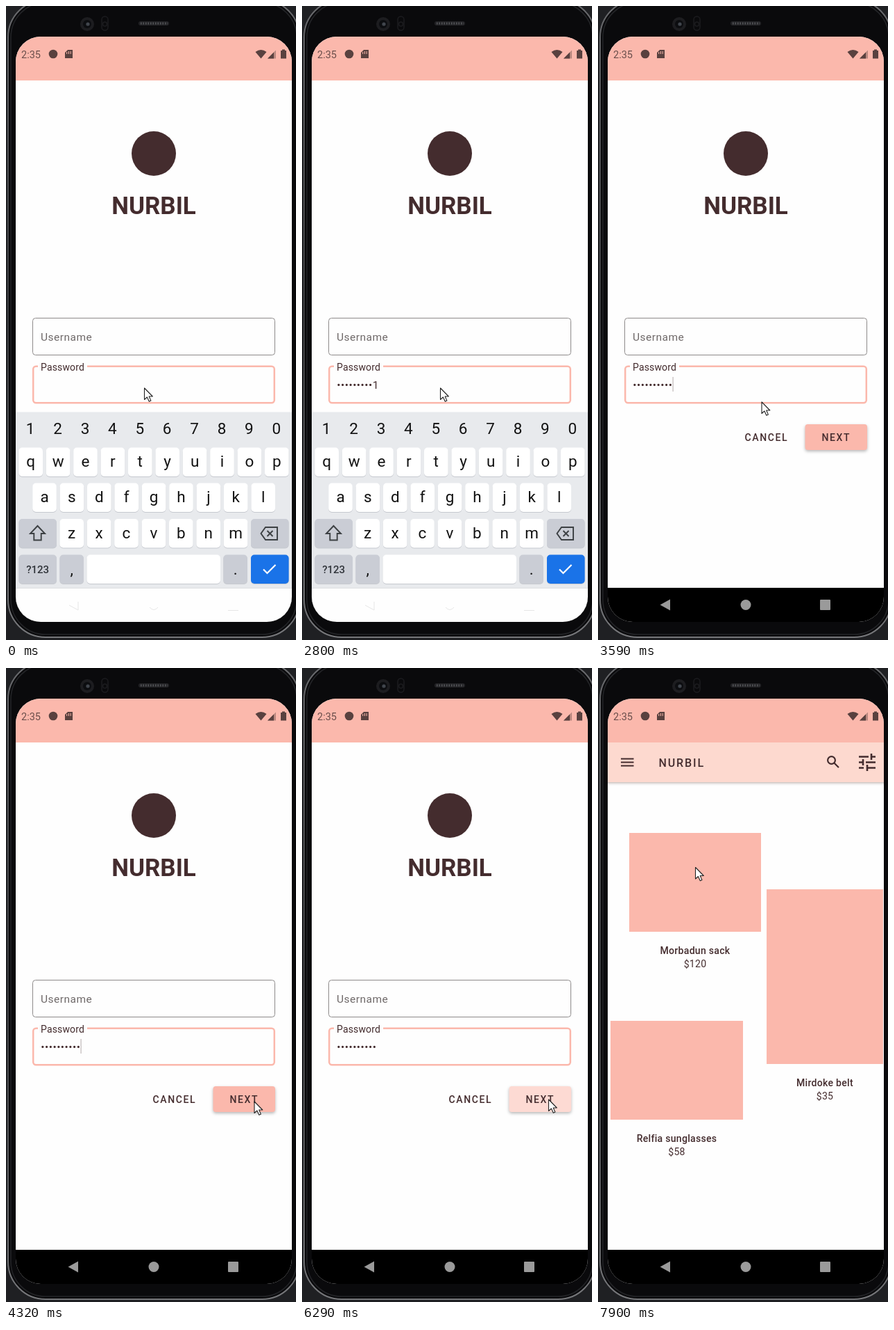
These frames come from a looping animation (418x911 px, 8 s). An HTML page:

```html
<!DOCTYPE html>
<html lang="en">
<head>
<meta charset="utf-8">
<title>Shop login</title>
<style>
  html, body { margin: 0; width: 100%; height: 100%; overflow: hidden; background: #1f2023; }
  svg { display: block; width: 418px; height: 911px; font-family: Roboto, sans-serif; }
  .ink { fill: #442c2e; }
  .line { fill: none; stroke: #442c2e; }
  .mid { text-anchor: middle; }
  .medium { font-weight: 500; }
  .field { font-size: 15.5px; letter-spacing: .48px; }
  .button { font-size: 14px; letter-spacing: 1.6px; }
  .product { font-size: 14px; letter-spacing: .3px; }
  .key { font-size: 22.5px; fill: #121212; text-anchor: middle; }
  #next { filter: drop-shadow(0 2px 2px rgba(0, 0, 0, .28)); }
  #bar { filter: drop-shadow(0 1px 2px rgba(90, 60, 50, .45)); }
</style>
</head>
<body>
<svg viewBox="0 0 418 911">
  <defs>
    <clipPath id="screen"><rect x="14" y="44" width="398" height="841" rx="36"/></clipPath>
    <linearGradient id="rim" x2="0" y2="1">
      <stop offset="0" stop-color="#6a6b6e"/>
      <stop offset=".5" stop-color="#3c3d40"/>
      <stop offset="1" stop-color="#77787b"/>
    </linearGradient>
  </defs>

  <!-- Phone body -->
  <rect x="3" y="-9" width="420" height="916" rx="54" fill="#0a0a0c" stroke="url(#rim)" stroke-width="2"/>
  <rect x="7" y="-5" width="412" height="908" rx="50" fill="none" stroke="#232427" stroke-width="1.5"/>
  <circle cx="117" cy="26" r="10" fill="#1d1d20"/>
  <circle cx="117" cy="26" r="6" fill="#0c0d10"/>
  <circle cx="118" cy="26" r="2.6" fill="#41464d"/>
  <g fill="none" stroke="#1c1c1f" stroke-width="1.5">
    <rect x="138" y="15" width="9" height="20" rx="4.5"/>
    <circle cx="142.5" cy="26" r="3"/>
  </g>
  <rect x="191" y="22" width="44" height="6" rx="3" fill="#242427"/>
  <path d="M194 25H233" stroke="#55565a" stroke-width="3" stroke-dasharray="1.5 2"/>

  <g clip-path="url(#screen)">
    <rect x="14" y="44" width="398" height="841" fill="#fefefe"/>

    <g id="login">
      <circle cx="213" cy="212" r="32" class="ink"/>
      <text x="213" y="298.5" class="ink mid" font-size="35" font-weight="700">NURBIL</text>
      <rect x="38.5" y="448.5" width="349" height="53" rx="4" fill="none" stroke="#8d8a8a"/>
      <text x="50" y="480.5" class="field" fill="#6f6969">Username</text>
      <rect x="39.2" y="517.7" width="347.6" height="52.6" rx="4" fill="none" stroke="#fbb8ac" stroke-width="2.5"/>
      <rect x="46" y="515" width="71" height="6" fill="#fefefe"/>
      <text x="50" y="523.5" class="ink" font-size="14" letter-spacing=".15">Password</text>
      <text id="secret" x="50.3" y="550" class="ink field"></text>
      <rect id="caret" y="533" width="1.4" height="21" fill="#c9c2c2"/>
      <text x="211.5" y="625" class="ink medium button">CANCEL</text>
      <rect id="next" x="298.5" y="601" width="89.5" height="37" rx="4"/>
      <text x="322.5" y="625" class="ink medium button">NEXT</text>
    </g>

    <g id="shop">
      <rect id="bar" x="8" y="100" width="410" height="64" fill="#fdd9cf"/>
      <path class="line" stroke-width="2" d="M33 130.5H51.5M33 135.5H51.5M33 140.5H51.5"/>
      <text x="87.5" y="141.7" class="ink medium" font-size="16" letter-spacing="1.9">NURBIL</text>
      <g class="line" stroke-width="2.2">
        <circle cx="336.5" cy="132.5" r="5.4"/>
        <path d="M340.5 136.5L347 143"/>
        <path stroke-width="2.6" d="M376 127.5H390M394 127.5H400M394 123V132M376 135.5H382M386 135.5H400M382 131V140M376 143.5H383M388 143.5H400M388 139V148"/>
      </g>
      <g id="cards"></g>
    </g>

    <!-- Status bar -->
    <rect x="14" y="44" width="398" height="63" fill="#fbb8ac"/>
    <text x="22" y="75" font-size="14.5" fill="#6a4e4b">2:35</text>
    <g fill="#59413f">
      <circle cx="68" cy="69" r="6.3"/>
      <path d="M89 63H96V75H85V67Z"/>
      <path d="M359.5 66Q367.5 60 375.5 66L367.5 75.5Z"/>
      <path d="M377 75.5L389 63.5V75.5Z" opacity=".4"/>
      <path d="M377 75.5L386 66.5V75.5Z"/>
      <path d="M396 64H398V62.5H402V64H404V75.5H396Z"/>
    </g>
    <path d="M87.7 66V69M90.4 65V69M93.2 65V69" stroke="#fbb8ac"/>

    <!-- Navigation bar -->
    <rect x="14" y="836" width="398" height="49"/>
    <g fill="#9a9a9a">
      <path d="M89.5 860.5L104 852.5V868.5Z"/>
      <circle cx="213" cy="860.5" r="7.5"/>
      <rect x="320" y="853" width="15" height="15" rx="1"/>
    </g>

    <g id="keyboard">
      <rect x="14" y="583.5" width="398" height="253" fill="#e8eaed"/>
      <rect x="14" y="836.5" width="398" height="49" fill="#fefefe"/>
      <path d="M14 836.5H412" stroke="#dedfe2"/>
      <path d="M91 861L104 868V856M207 864Q213 871 219 864M320 868.5H335" fill="none" stroke="#e6e6e6"/>
      <g id="keys"></g>
      <g fill="none" stroke="#3c4043" stroke-width="1.9">
        <path d="M45.5 747L56 758H50.7V767.5H40.3V758H35Z"/>
        <path d="M374 749H391V767H374L367.5 758ZM376.5 754L384.5 762M384.5 754L376.5 762"/>
        <path d="M371 809.5L376.5 815L388.5 803" stroke="#fff" stroke-width="2.2"/>
      </g>
    </g>
  </g>

  <path id="mouse" d="M0 0V16.5L3.9 13L6.8 19.3L9.4 18.1L6.7 12H11.8Z" fill="#fff" stroke="#222" stroke-width="1.1" stroke-linejoin="round"/>
</svg>

<script>
const LOOP = 8000, PITCH = 39.4;
const $ = id => document.getElementById(id);

function add(parent, tag, attrs, text = '') {
  const el = document.createElementNS('http://www.w3.org/2000/svg', tag);
  for (const name in attrs) el.setAttribute(name, attrs[name]);
  el.textContent = text;
  parent.append(el);
}

function label(x, y, text) {
  add($('keys'), 'text', { x, y, class: 'key' }, text);
}

function key(x, y, width, fill = '#fff') {
  const shape = { x, width, height: 41.5, rx: 5 };
  add($('keys'), 'rect', { ...shape, y: y + 1, fill: '#c6c9cf' });
  add($('keys'), 'rect', { ...shape, y, fill });
}

// Letter rows: characters, first centre, top
[['qwertyuiop', 35.7, 634.5], ['asdfghjkl', 55.5, 685.5], ['zxcvbnm', 94.7, 737]]
  .forEach(([row, x, y]) => [...row].forEach((char, i) => {
    key(x + i * PITCH - 17.3, y, 34.6);
    label(x + i * PITCH, y + 27.5, char);
  }));
[...'1234567890'].forEach((char, i) => label(35.2 + i * PITCH, 615, char));

const GREY = '#cacdd5';
key(18.4, 737, 54.6, GREY);
key(353, 737, 54.6, GREY);
key(18.4, 788.5, 54.6, GREY);
key(77.4, 788.5, 34.6, GREY);
key(116.5, 788.5, 192.5);
key(313.3, 788.5, 34.6, GREY);
key(353, 788.5, 54.6, '#1a73e8');
add($('keys'), 'text', { x: 45.6, y: 815, class: 'mid medium', 'font-size': 15, fill: '#30343a' }, '?123');
label(94.7, 817, ',');
label(330.6, 817, '.');

// x, y, width, height, label centre, name, price
[
  [45, 237, 190, 142, 140, 'Morbadun sack', '$120'],
  [243, 318, 168, 251, 327, 'Mirdoke belt', '$35'],
  [18, 507, 191, 142, 113.5, 'Relfia sunglasses', '$58']
].forEach(([x, y, width, height, mid, name, price]) => {
  const base = y + height + 32;
  add($('cards'), 'rect', { x, y, width, height, fill: '#fbb8ac' });
  add($('cards'), 'text', { x: mid, y: base, class: 'ink mid medium product' }, name);
  add($('cards'), 'text', { x: mid, y: base + 19, class: 'ink mid product' }, price);
});

// Each track: [start time, values...], held until the next entry
const typed = [
  [0, 0, ''], [500, 1, 'e'], [1630, 2, 'a'], [2160, 5, 'n'],
  [2310, 7, 'o'], [2430, 9, '1'], [3590, 10, '']
];
const caret = [
  [0, 0], [500, 65.5], [1630, 71.5], [2160, 88.5], [2310, 100], [2430, 111.4], [2800, 0],
  [3320, 111.4], [3590, 107.4], [3830, 0], [4320, 107.4], [4830, 0], [5140, 107.4], [5790, 0]
];
const keyboard = [[0, 0, 1], [3200, 98, .33], [3320, 0, 0]];
const mouse = [
  [0, 199.5, 549], [3590, 236, 569], [3710, 300, 598], [3830, 350, 617], [3950, 370, 622],
  [4070, 358, 623], [5140, 357, 626], [5260, 355.5, 627], [5790, 355.5, 620],
  [7380, 340, 604], [7500, 301, 567], [7650, 95.5, 423], [7900, 140.5, 286.5]
];

const at = (track, t) => track.findLast(entry => entry[0] <= t).slice(1);
const show = (id, on) => { $(id).style.display = on ? '' : 'none'; };

function draw(t) {
  const [dots, last] = at(typed, t);
  $('secret').textContent = '•'.repeat(dots) + last;

  const [caretX] = at(caret, t);
  $('caret').setAttribute('x', caretX);
  show('caret', caretX > 0);

  const [drop, alpha] = at(keyboard, t);
  $('keyboard').setAttribute('transform', `translate(0 ${drop})`);
  $('keyboard').setAttribute('opacity', alpha);

  $('next').setAttribute('fill', t < 6290 ? '#fbb8ac' : '#fddad3');
  show('login', t < 6870);
  show('shop', t >= 6870);
  $('mouse').setAttribute('transform', `translate(${at(mouse, t)})`);
}

const start = performance.now();
function tick() {
  draw((performance.now() - start) % LOOP);
  requestAnimationFrame(tick);
}
tick();
</script>
</body>
</html>
```
